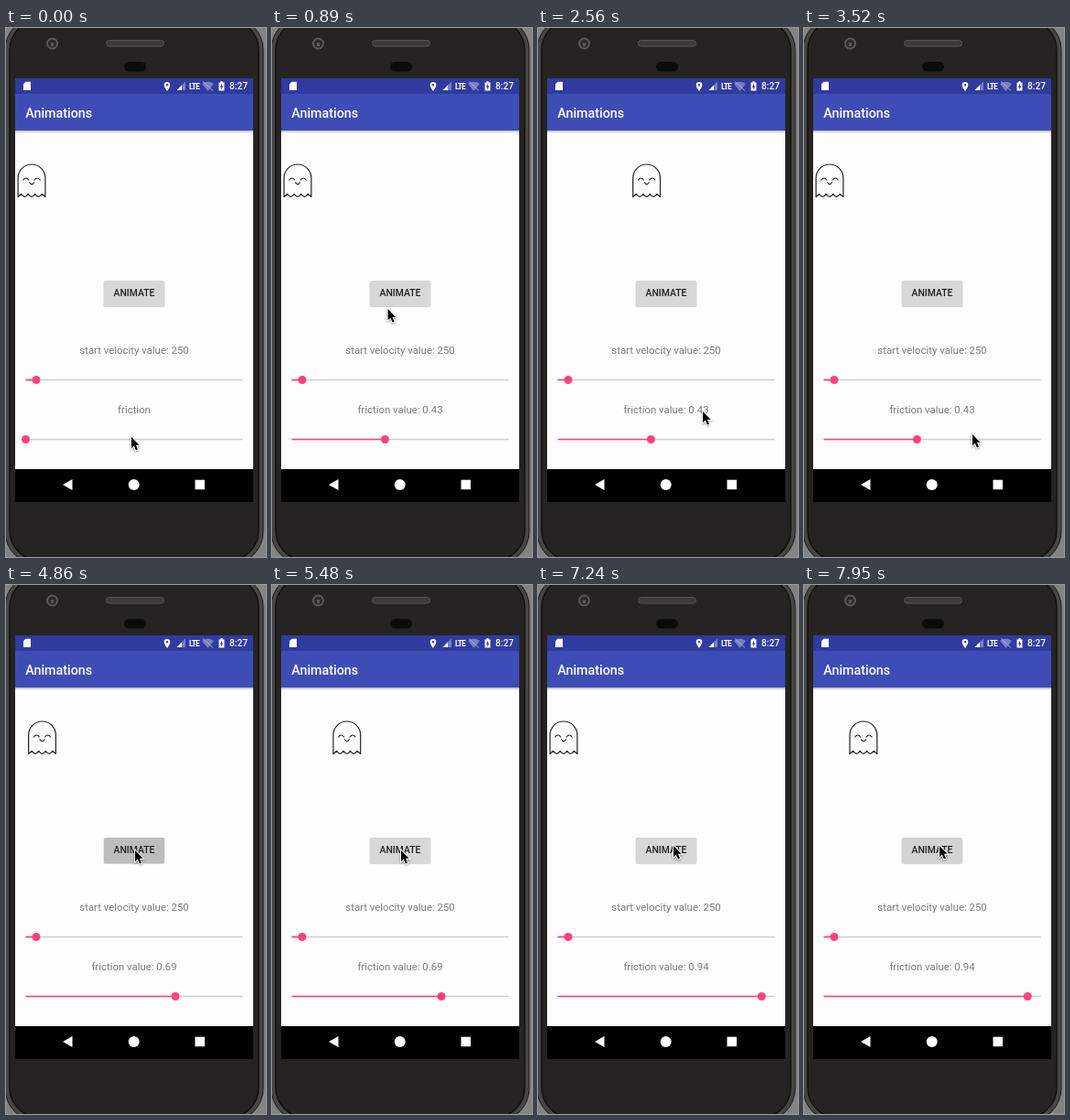
Recreate the animation shown at these times as an HTML page. Size 284 by 578 pixels, loop 8000 ms.

```html
<!DOCTYPE html>
<html lang="en">
<meta charset="utf-8">
<title>Fling animation</title>
<style>
  html, body { margin: 0; width: 284px; height: 578px; overflow: hidden; background: #454341; }
  svg { display: block; }
  text { font: 11.4px Roboto, sans-serif; fill: #7b7b7b; }
  .mid { text-anchor: middle; }
  .medium { font-weight: 500; }
  #cursor { filter: drop-shadow(0 1px 1px rgba(0, 0, 0, .4)); }
</style>
<svg width="284" height="578" viewBox="0 0 284 578">
  <defs>
    <linearGradient id="shade" x2="0" y2="1">
      <stop stop-opacity=".28"/><stop offset="1" stop-opacity="0"/>
    </linearGradient>
  </defs>

  <!-- Phone body -->
  <rect width="284" height="578" fill="#838383"/>
  <rect x="-1" y="-12" width="282" height="598" rx="36" fill="#484644" stroke="#1b1a19"/>
  <rect x="4" y="-9" width="272" height="591" rx="33" fill="#252422" stroke="#111" stroke-width="1.5"/>
  <circle cx="50.5" cy="17" r="5.5" fill="#2b2a29" stroke="#5b5956" stroke-width="2"/>
  <path d="M50.500 16V20" stroke="#5b5957" stroke-width="3"/>
  <rect x="109.500" y="13.500" width="63" height="6.500" rx="3.250" fill="#3d3b39" stroke="#575552"/>
  <rect x="129" y="37" width="24" height="10.500" rx="5.200" fill="#0b0b0b"/>

  <!-- Screen -->
  <rect x="10" y="55" width="260" height="463" fill="#fdfdfd"/>
  <rect x="10" y="112" width="260" height="3" fill="url(#shade)"/>
  <rect x="10" y="72" width="260" height="40" fill="#3d4db5"/>
  <rect x="10" y="55" width="260" height="17" fill="#303b9f"/>
  <rect x="10" y="482" width="260" height="36"/>

  <!-- Status bar -->
  <g fill="#fff">
    <path d="M21.500 58.800H27V68H19V61.300Z"/>
    <path fill-rule="evenodd" d="M176 69C174 66.300 172.700 64.300 172.700 62.300A3.300 3.300 0 0 1 179.300 62.300C179.300 64.300 178 66.300 176 69ZM176 61A1.200 1.200 0 0 0 176 63.400A1.200 1.200 0 0 0 176 61Z"/>
    <path opacity=".35" d="M196 58.500V68H186.500Z"/>
    <path d="M192 62.500V68H186.500Z"/>
    <path opacity=".35" d="M214 61Q220.500 56.500 227 61L220.500 69Z"/>
    <path fill="none" stroke="#aab0dc" d="M215 58.500L226 68.500"/>
    <path d="M232.500 59.500H234.300V58.300H236.700V59.500H238.500V68.500H232.500Z"/>
    <path fill="#303b9f" d="M236 60.700L233.800 64.700H235.200V67.500L237.300 63.500H236Z"/>
  </g>
  <text x="200" y="67" style="font-size:8.500px;font-weight:700;letter-spacing:-1px;fill:#fff">LTE</text>
  <text class="medium" x="244" y="67.300" style="font-size:10.200px;fill:#fff">8:27</text>
  <text class="medium" x="21.300" y="97.700" style="font-size:14.300px;fill:#fff">Animations</text>

  <!-- Navigation bar -->
  <g fill="#fff">
    <path d="M62 499L72.500 493V505Z"/>
    <circle cx="139.700" cy="499" r="6"/>
    <rect x="206.500" y="493.700" width="10.500" height="10.500"/>
  </g>

  <g id="ghost" fill="none" stroke="#222" stroke-width="1.200" stroke-linecap="round" stroke-linejoin="round">
    <path d="M13.100 184.500V164A14.900 15 0 0 1 42.900 164V184.500l-3.650-3.200q-3.750 6-7.500 0q-3.750 6-7.500 0q-3.750 6-7.500 0Z"/>
    <path d="M18.800 166q3-4 6 0M31.200 166q3-4 6 0M25.600 168.800q2.500 4 5 0"/>
  </g>

  <!-- Controls -->
  <rect x="106.500" y="276.500" width="67" height="28.500" rx="2" opacity=".15"/>
  <rect x="107" y="276" width="66" height="28" rx="1.500" fill="#d6d7d7"/>
  <rect id="ripple" x="107" y="276" width="66" height="28" rx="1.500" opacity="0"/>
  <text class="mid medium" x="140" y="293.400" style="font-size:10.400px;fill:#222">ANIMATE</text>
  <text class="mid" x="140" y="355.800">start velocity value: 250</text>
  <text class="mid" x="140" y="420.800" id="label">friction</text>
  <path d="M21.500 384.500H258.500M21.500 449.500H258.500" stroke="#cfcfcf" stroke-width="1.400"/>
  <g fill="#ff4081" stroke="#ff4081">
    <path d="M21.500 384.500H33" stroke-width="1.700"/>
    <circle cx="33" cy="384.500" r="4.500" stroke="none"/>
    <path id="track" stroke-width="1.700"/>
    <circle id="thumb" cy="449.500" r="4.500" stroke="none"/>
  </g>

  <path id="cursor" d="M1 2V14.200L3.800 11.600L6 16.500L8 15.600L5.900 10.800H9.700Z" stroke="#fff" stroke-width="1.800" paint-order="stroke"/>
</svg>
<script>
const LOOP = 8000, STEP = 88.3;
const SPEED = 180.5;              // start velocity, px/s
const DRAG = 4.2;                 // friction multiplier of the fling physics
const [ghost, ripple, label, track, thumb, cursor] =
  ['ghost', 'ripple', 'label', 'track', 'thumb', 'cursor'].map(id => document.getElementById(id));

// Slider click, button press and fling start, in ms
const runs = [
  { click: 350, press: 1236, fling: 1248, friction: 0.43 },
  { click: 3690, press: 4680, fling: 4786, friction: 0.69 },
  { click: 6615, press: 7505, fling: 7530, friction: 0.94 },
];

// Cursor: time, x, y
const path = [
  [0, 136, 445], [177, 121, 447], [440, 121, 447], [975, 126, 293],
  [2040, 126, 293], [2560, 179, 417], [2920, 179, 417], [3200, 176, 432],
  [3530, 183, 442], [3780, 183, 442], [4325, 140, 288], [5490, 140, 288],
  [5915, 259, 464], [6100, 259, 464], [6358, 241, 449], [6700, 241, 449],
  [7241, 147, 283], [LOOP, 147, 283],
];

function cursorAt(t) {
  const i = path.findIndex(key => key[0] > t);
  const [t0, x0, y0] = path[i - 1], [t1, x1, y1] = path[i];
  const u = (t - t0) / (t1 - t0), k = u * u * (3 - 2 * u);
  return [x0 + (x1 - x0) * k, y0 + (y1 - y0) * k];
}

// Exponential decay; the ghost returns home once it has slowed to 1/16 speed
function flingOffset(t, { fling, friction }) {
  const rate = DRAG * friction, s = (t - fling) / 1000;
  return s < 0 || s > Math.log(16) / rate ? 0 : SPEED / rate * (1 - Math.exp(-rate * s));
}

function rippleAlpha(ms) {
  return ms < 0 ? 0 : 0.12 * Math.min(1, (ms + 50) / 150, Math.max(0, (500 - ms) / 320));
}

function draw(now) {
  const t = Math.floor((now % LOOP + 20) / STEP) * STEP;
  const run = runs.findLast(r => t >= r.click);
  const x = 21.5 + 237 * (run ? run.friction : 0);
  label.textContent = run ? `friction value: ${run.friction}` : 'friction';
  track.setAttribute('d', `M21.5 449.5H${x}`);
  thumb.setAttribute('cx', x);
  ghost.setAttribute('transform', `translate(${run ? flingOffset(t, run) : 0})`);
  ripple.setAttribute('opacity', run ? rippleAlpha(t - run.press) : 0);
  cursor.setAttribute('transform', `translate(${cursorAt(t)})`);
}

const start = performance.now();
(function tick() {
  draw(performance.now() - start);
  requestAnimationFrame(tick);
})();
</script>
</html>
```
